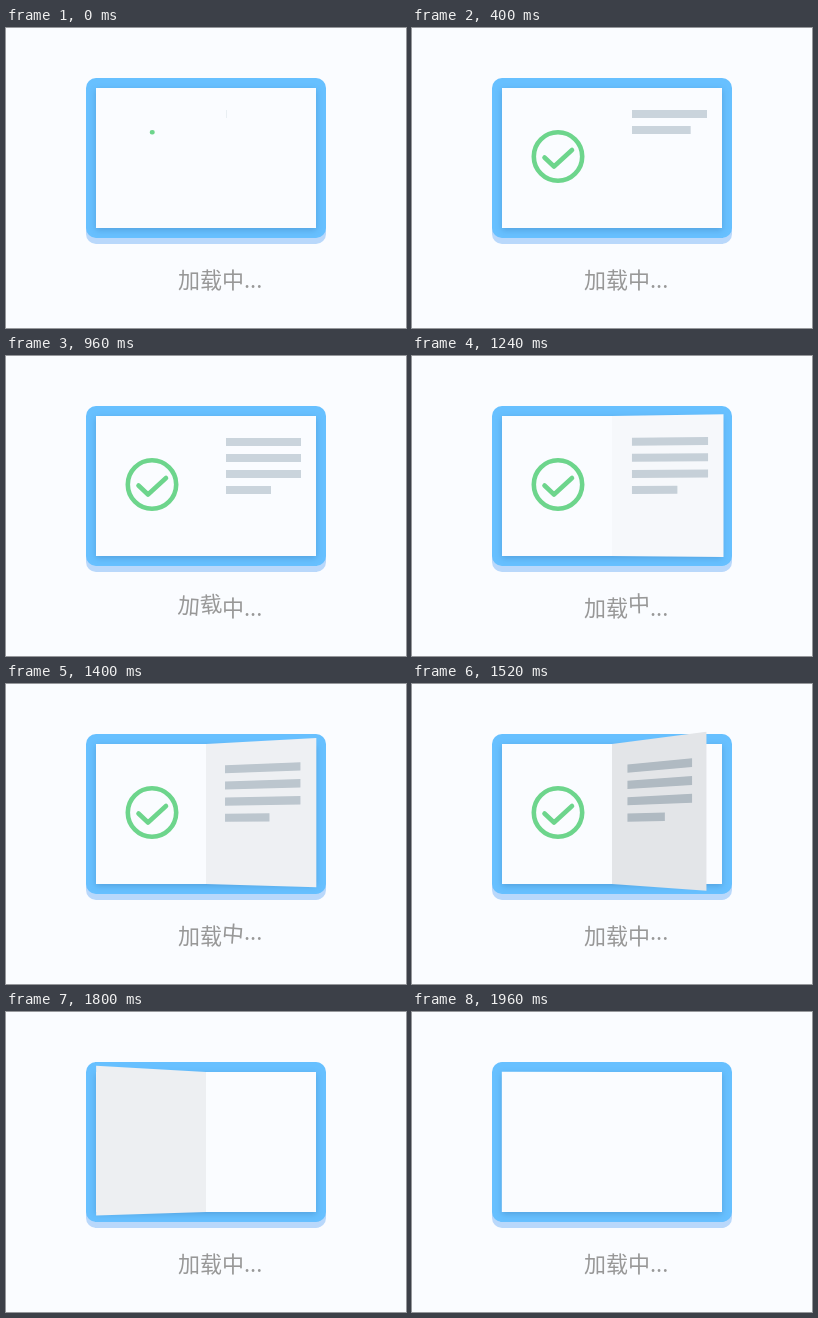
An HTML page that plays this animation: 400 by 300 pixels, repeating every 2000 ms.

```html
<!DOCTYPE html>
<html lang="zh-CN">
<head>
<meta charset="utf-8">
<style>
  html, body { margin: 0; width: 100%; height: 100%; overflow: hidden; background: #fafcff; }
  svg { display: block; }
  .inner { filter: drop-shadow(0 2px 3px rgba(0, 40, 90, .2)); }
  .draw { fill: none; stroke: #6dd58c; stroke-width: 4.6; stroke-linecap: round; stroke-linejoin: round; }
  text { font: 22px "Noto Sans CJK SC", "Noto Sans CJK", "Noto Sans CJK JP", sans-serif; fill: #989898; }
</style>
</head>
<body>
<svg width="400" height="300" viewBox="0 0 400 300">
  <rect x="80" y="56" width="240" height="160" rx="10" fill="#b9d8fb"/>
  <rect x="80" y="50" width="240" height="160" rx="10" fill="#67c0ff"/>
  <rect class="inner" x="90" y="60" width="220" height="140" fill="#fafcff"/>
  <circle id="ring" class="draw" cx="146" cy="128.5" r="24.2" pathLength="1" transform="rotate(-90 146 128.5)"/>
  <path id="tick" class="draw" d="M132.5 129.5L142 138.5L160 122" pathLength="1"/>
  <polygon id="page"/>
  <g id="lines"><polygon/><polygon/><polygon/><polygon/></g>
  <g id="label">
    <text x="172" y="260">加</text><text x="194" y="260">载</text><text x="216" y="260">中</text><text x="238" y="260">...</text>
  </g>
</svg>
<script>
const LOOP = 2000, DEPTH = 600;
const $ = id => document.getElementById(id);
const page = $('page'), lines = [...$('lines').children], letters = [...$('label').children];
const clamp = v => Math.min(1, Math.max(0, v));
const span = (t, start, length) => clamp((t - start) / length);
const bezier = (s, a, b) => 3 * a * s * (1 - s) ** 2 + 3 * b * s * s * (1 - s) + s ** 3;

function turnEase(x) {
  let lo = 0, hi = 1;
  for (let i = 0; i < 24; i++) {
    const mid = (lo + hi) / 2;
    if (bezier(mid, .86, .56) < x) lo = mid; else hi = mid;
  }
  return bezier(lo, 0, 1);
}

// A point on the page hinged at x = 200, seen from the stage centre
function project(x, y, angle) {
  const k = DEPTH / (DEPTH - x * Math.sin(angle));
  return [200 + x * Math.cos(angle) * k, 150 + (y - 150) * k];
}

function setBox(el, x, y, w, h, angle) {
  const corners = [[x, y], [x + w, y], [x + w, y + h], [x, y + h]];
  el.setAttribute('points', corners.map(([px, py]) => project(px, py, angle)).join(' '));
}

function shade(rgb, amount) {
  return `rgb(${rgb.map(c => Math.round(c - amount))})`;
}

function stroke(el, p) {
  el.style.strokeDasharray = p < 1 ? `${p} 2` : 'none';
  el.style.visibility = p > 0 ? 'visible' : 'hidden';
}

function render(t) {
  stroke($('ring'), span(t, 0, 300));
  stroke($('tick'), span(t, 180, 200));

  const angle = Math.PI * turnEase(span(t, 1000, 1000));
  const dark = Math.sin(angle);
  setBox(page, 0, 60, 110, 140, angle);
  page.setAttribute('fill', shade([250, 252, 255], 35 * dark));

  $('lines').style.visibility = angle < Math.PI / 2 ? 'visible' : 'hidden';
  $('lines').setAttribute('fill', shade([202, 212, 220], 40 * dark));
  lines.forEach((line, i) =>
    setBox(line, 20, 82 + 16 * i, (i < 3 ? 75 : 45) * span(t, 225 * i, 225), 8, angle));

  letters.forEach((letter, i) => {
    const p = span(t, 620 + 220 * i, 400);
    const lift = -4.5 * Math.sin(Math.PI * p);
    const tilt = i < 3 ? -6 * Math.sin(2 * Math.PI * p) : 0;
    letter.setAttribute('transform', `translate(0 ${lift}) rotate(${tilt} ${183 + 22 * i} 252)`);
  });
}

const begin = performance.now();
function tick() {
  render((performance.now() - begin) % LOOP);
  requestAnimationFrame(tick);
}
tick();
</script>
</body>
</html>
```
